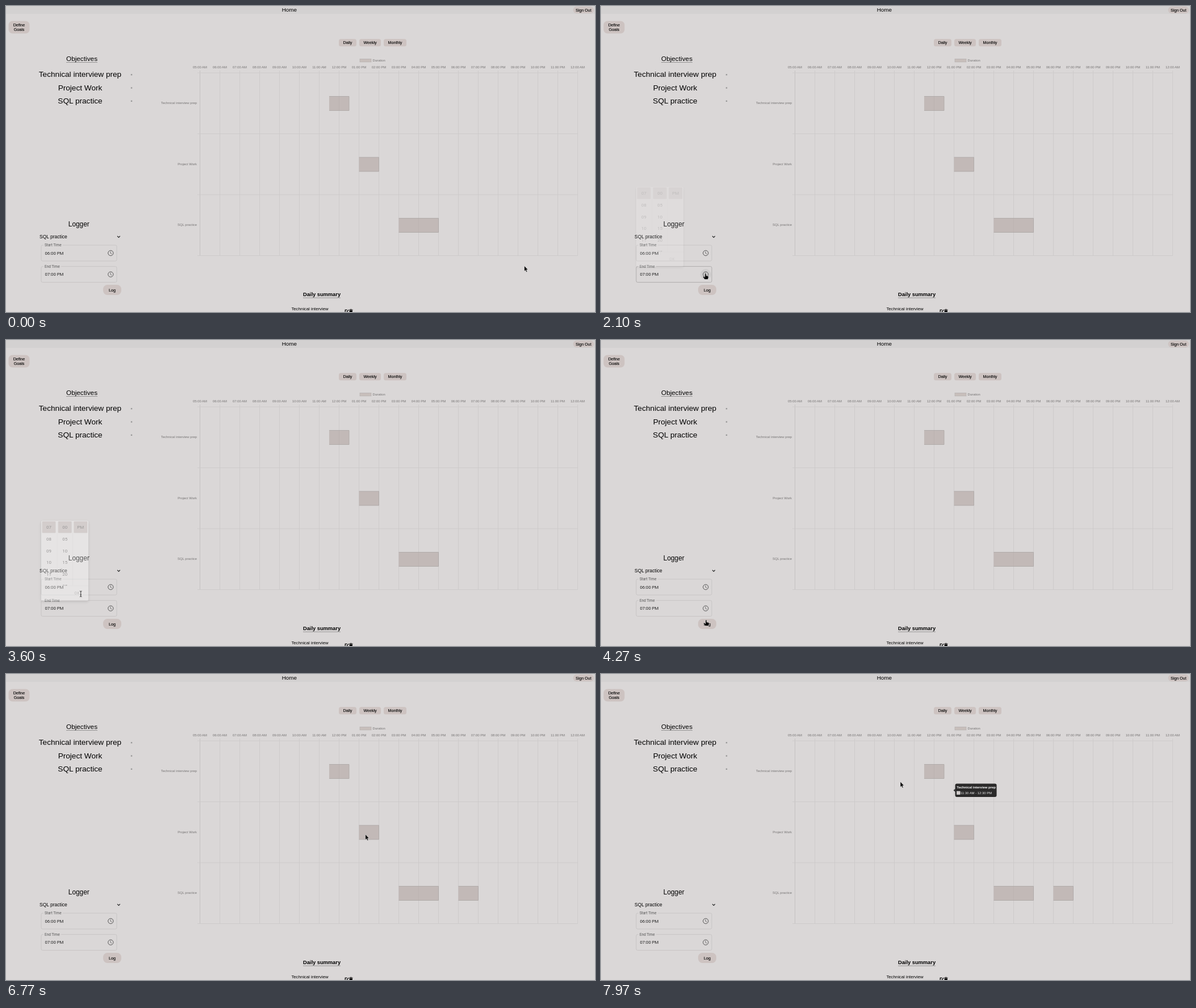
These frames come from a looping animation (1037x540 px, 8 s). An HTML page:

```html
<!DOCTYPE html>
<html lang="en">
<head>
<meta charset="utf-8">
<title>Planner</title>
<style>
html, body { margin: 0; width: 100%; height: 100%; overflow: hidden; background: #dad7d7; }
svg { display: block; font-family: "Liberation Sans", Arial, sans-serif; }
.ui { font-family: Roboto, sans-serif; }
</style>
</head>
<body>
<svg id="stage" width="1037" height="540" viewBox="0 0 1037 540"></svg>
<script>
const stage = document.getElementById('stage');
const LOOP = 8000, PINK = '#cdc3c1', BG = '#dad7d7';

const text = (x, y, size, str, attrs = '') =>
  `<text x="${x}" y="${y}" font-size="${size}" text-anchor="middle" ${attrs}>${str}</text>`;
const left = (x, y, size, str, attrs = '') => text(x, y, size, str, `style="text-anchor:start" ${attrs}`);
const rect = (x, y, w, h, fill, attrs = '') =>
  `<rect x="${x}" y="${y}" width="${w}" height="${h}" fill="${fill}" ${attrs}/>`;
const path = (d, stroke, width = 1, attrs = '') =>
  `<path d="${d}" fill="none" stroke="${stroke}" stroke-width="${width}" ${attrs}/>`;

function button(x, y, w, h, r, lines, id = '') {
  const mid = y + h / 2 + 2.5 - (lines.length - 1) * 4.2;
  return rect(x, y, w, h, PINK, `rx="${r}" id="${id}"`) +
    lines.map((s, i) => text(x + w / 2, mid + i * 8.4, 7.1, s, 'stroke="#000" stroke-width=".12"')).join('');
}

function bar(x, y, w, id = '') {
  return `<g id="${id}">` + rect(x, y, w, 25, 'rgba(172,156,152,.5)') +
    path(`M${x} ${y}h${w}v25h${-w}`, '#aaa5a4', .8) + '</g>';
}

function field(y, label, labelWidth, time, id) {
  return rect(62, y, 133, 28, 'none', `rx="2.5" stroke="#c3c0c0" stroke-width=".8" id="${id}"`) +
    rect(66, y - 1, labelWidth + 4, 2, BG) +
    left(68, y + 2.2, 6.4, label, 'class="ui" fill="#555"') +
    left(68.5, y + 16.5, 7.75, time, 'class="ui" fill="#222"') +
    `<circle cx="184.3" cy="${y + 14}" r="9.5" opacity="0" id="${id}Halo"/>` +
    `<circle cx="184.3" cy="${y + 14}" r="4.6" fill="none" stroke="#555"/>` +
    path(`M184 ${y + 11}v3.2l2.4 1.5`, '#555', .8);
}

function chart() {
  const hours = [5, 6, 7, 8, 9, 10, 11, 12, 1, 2, 3, 4, 5, 6, 7, 8, 9, 10, 11, 12];
  const grey = 'fill="#757373"';
  let out = rect(623, 93.3, 20, 5.6, '#c7bebb', 'stroke="#b3adac" stroke-width=".6"') +
    left(645.5, 98, 5.93, 'Duration', grey);
  hours.forEach((h, i) => {
    const x = 341.5 + i * 35;
    const hour = i === 5 ? '10' : String(h).padStart(2, '0');
    const half = i < 7 || i === 19 ? 'AM' : 'PM';
    out += path(`M${x} 114V440.5`, i ? '#cbc8c8' : '#bebbbb', .8) +
      text(x, 110.3, 5.93, `${i === 5 ? '10' : hour}:00 ${half}`, grey);
  });
  for (let i = 0; i < 4; i++) out += path(`M337 ${118 + i * 107.5}H1006.5`, '#cbc8c8', .8);
  ['Technical interview prep', 'Project Work', 'SQL practice'].forEach((s, i) => {
    out += text(336, 173.3 + i * 107.5, 5.93, s, `style="text-anchor:end" ${grey}`);
  });
  return out + bar(569, 159.5, 35) + bar(621.5, 267, 35) + bar(691.5, 374.5, 70) +
    bar(796.5, 374.5, 35, 'newBar');
}

function popup() {
  const columns = [[75.5, ['07', '08', '09', '10', '11']], [103.7, ['00', '05', '10', '15', '20', '25']], [131.3, ['PM']]];
  let out = rect(62, 319, 83, 141, '#fff', 'rx="2.5" filter="url(#shadow)"') +
    path('M90 319.5V433.5M117.5 319.5V433.5M62 433.8H145', '#e6e4e4', .6) + '<g clip-path="url(#list)">';
  for (const [x, items] of columns) {
    out += rect(x - 12, 320, 24, 20.5, '#c6bcba', 'rx="1"') +
      items.map((s, i) => text(x, 332.9 + i * 20.8, 7.9, s, 'class="ui" fill="#222"')).join('');
  }
  return out + '</g>' + text(125, 449, 6.8, 'OK', 'class="ui" fill="#aaa" font-weight="500" letter-spacing=".2"');
}

stage.innerHTML = `<defs>
  <filter id="shadow" x="-20%" y="-20%" width="140%" height="140%">
    <feDropShadow dx="0" dy="2" stdDeviation="2.5" flood-opacity=".35"/></filter>
  <clipPath id="list"><rect x="62" y="319" width="83" height="114.5"/></clipPath></defs>` +
  rect(0, 0, 1037, 540, BG) + rect(0, 0, 1037, 14, '#d3d1d1') +
  text(498.8, 10.3, 9.8, 'Home') +
  button(998.5, 1, 36.5, 12, 6, ['Sign Out']) +
  button(4.5, 26.5, 37, 22, 7, ['Define', 'Goals']) +
  button(586, 58.3, 31, 13, 3.5, ['Daily']) +
  button(622, 58.3, 38, 13, 3.5, ['Weekly']) +
  button(665, 58.3, 40, 13, 3.5, ['Monthly']) +
  text(133.5, 96.7, 11.8, 'Objectives') + path('M106 99.5H161', '#777', .7) +
  ['Technical interview prep', 'Project Work', 'SQL practice'].map((s, i) =>
    text(130.5, 125.3 + i * 23.3, 13.64, s) + rect(219.8, 120 + i * 23.3, 2.4, 2.4, '#999')).join('') +
  chart() +
  text(128.3, 389, 11.85, 'Logger') +
  left(59, 410, 8.5, 'SQL practice') + path('M196 406l2.4 2.4 2.4-2.4', '#222', 1.1) +
  field(422, 'Start Time', 30, '06:00 PM', 'start') +
  field(459.6, 'End Time', 27, '07:00 PM', 'end') +
  button(171, 492, 32, 18, 7.5, ['Log'], 'log') +
  text(556, 511.6, 9.3, 'Daily summary', 'font-weight="bold"') + path('M523 515H589', '#777', .7) +
  text(535, 537.3, 7.77, 'Technical interview') +
  path('M600.5 536.3H597.2V541M599.8 540.2L603.2 536.2', '#000', 1.2) +
  path('M604 536.2H610.6M606 535.3H608.6', '#000', .9) + rect(604.7, 537.2, 5.2, 4, '#000') +
  `<g id="popup">${popup()}</g><g id="tip"></g>` +
  `<g id="cursor" stroke-linejoin="round">
    <path id="arrow" stroke="#e6e4e4" stroke-width=".6" d="M0 0V9.6L2.1 7.7 3.6 11 5.2 10.3 3.7 7.1H6.5Z"/>
    <path id="hand" stroke="#d5d2d2" stroke-width=".5" d="M-1 .5Q0-.6 1 .5V3.8L4.4 4.8Q5.6 5.3 5.1 7L4.2 10.3H-1.5L-4.3 6.4Q-4.4 4.8-2.9 5.4L-1 6.8Z"/>
    <path id="beam" fill="none" stroke="#222" stroke-width=".9" d="M-1.8-5Q0-5 0-4Q0-5 1.8-5M0-4.2V4.2M-1.8 5Q0 5 0 4Q0 5 1.8 5M-1 1.5H1"/>
  </g>`;

const $ = id => document.getElementById(id);
const clamp = p => Math.max(0, Math.min(1, p));
const ramp = (t, a, b) => clamp((t - a) / (b - a));
const smooth = p => p * p * (3 - 2 * p);
const easeOut = p => 1 - (1 - p) ** 2;
const easeIn = p => p * p;
const linear = p => p;

// start, end, easing, then a quadratic curve: from, control, to
const moves = [
  [340, 800, smooth, 912.5, 458.5, 600, 474, 293, 442],
  [1060, 1830, smooth, 293, 442, 235, 450, 184, 472],
  [2470, 3030, easeOut, 184, 472, 155, 478, 127, 446],
  [3470, 4270, smooth, 127, 446, 160, 460, 185, 494],
  [4270, 4530, easeOut, 185, 494, 188, 498, 193, 501],
  [6020, 6830, smooth, 193, 501, 400, 410, 640, 279],
  [7150, 7370, easeIn, 640, 279, 510, 340, 390, 399],
  [7370, 7970, linear, 390, 399, 300, 501, 527, 190]
];

function cursorAt(t) {
  const move = moves.filter(m => m[0] <= t).pop() || moves[0];
  const [a, b, ease, x0, y0, cx, cy, x1, y1] = move;
  const p = ease(ramp(t, a, b)), q = 1 - p;
  return [q * q * x0 + 2 * p * q * cx + p * p * x1, q * q * y0 + 2 * p * q * cy + p * p * y1];
}

const inside = (x, y, l, t, r, b) => x >= l && x <= r && y >= t && y <= b;

function cursorShape(x, y, popupOpen) {
  if (popupOpen && inside(x, y, 62, 319, 145, 460)) return y > 434 && x > 112 ? 'hand' : 'arrow';
  if (inside(x, y, 171, 491, 203, 511)) return 'hand';
  for (const top of [422, 459]) {
    if (Math.hypot(x - 184, y - top - 14) < 9.5) return 'hand';
    if (inside(x, y, 62, top, 195, top + 29)) return 'beam';
  }
  return 'arrow';
}

function drawTip(t) {
  const p = 1 - (1 - ramp(t, 7870, 8270)) ** 4;
  const x = 657 - 53 * p, y = 279.5 - 108 * p;
  const first = t < 7870, w = first ? 68.5 : 73;
  $('tip').setAttribute('opacity', ramp(t, 6800, 7000));
  $('tip').innerHTML = rect(x + 3, y - 11.7, w, 23.4, '#2b2a2a', 'rx="3"') +
    `<path d="M${x} ${y}l3.2-2.8v5.6z" fill="#2b2a2a"/>` +
    rect(x + 6, y + 1.8, 5.6, 5.6, '#d2cccb', 'stroke="#fff" stroke-width=".5"') +
    left(x + 5.7, y - 3.5, 5.93, first ? 'Project Work' : 'Technical interview prep', 'fill="#fff" font-weight="bold"') +
    left(x + 12.4, y + 6.7, 5.93, first ? '01:00 PM - 02:00 PM' : '11:30 AM - 12:30 PM', 'fill="#eee"');
}

function draw(t) {
  const [x, y] = cursorAt(t);
  const open = ramp(t, 2070, 2300) * (1 - ramp(t, 3470, 3670));
  const shape = cursorShape(x, y, open > .5);
  $('cursor').setAttribute('transform', `translate(${x} ${y})`);
  for (const id of ['arrow', 'hand', 'beam']) $(id).style.display = id === shape ? '' : 'none';

  $('popup').setAttribute('opacity', open);
  const overEnd = inside(x, y, 62, 459, 195, 488);
  $('end').setAttribute('stroke', overEnd ? '#a5a2a2' : '#c3c0c0');
  $('endHalo').setAttribute('opacity', overEnd || open > .5 ? .05 : 0);

  const press = ramp(t, 4280, 4530) * (1 - ramp(t, 6060, 6310));
  const tone = [205, 195, 193].map(v => Math.round(v - 50 * press));
  $('log').setAttribute('fill', `rgb(${tone})`);
  $('newBar').style.display = t >= 4930 ? '' : 'none';
  drawTip(t);
}

const begin = performance.now();
function frame() {
  draw((performance.now() - begin) % LOOP);
  requestAnimationFrame(frame);
}
frame();
</script>
</body>
</html>
```
